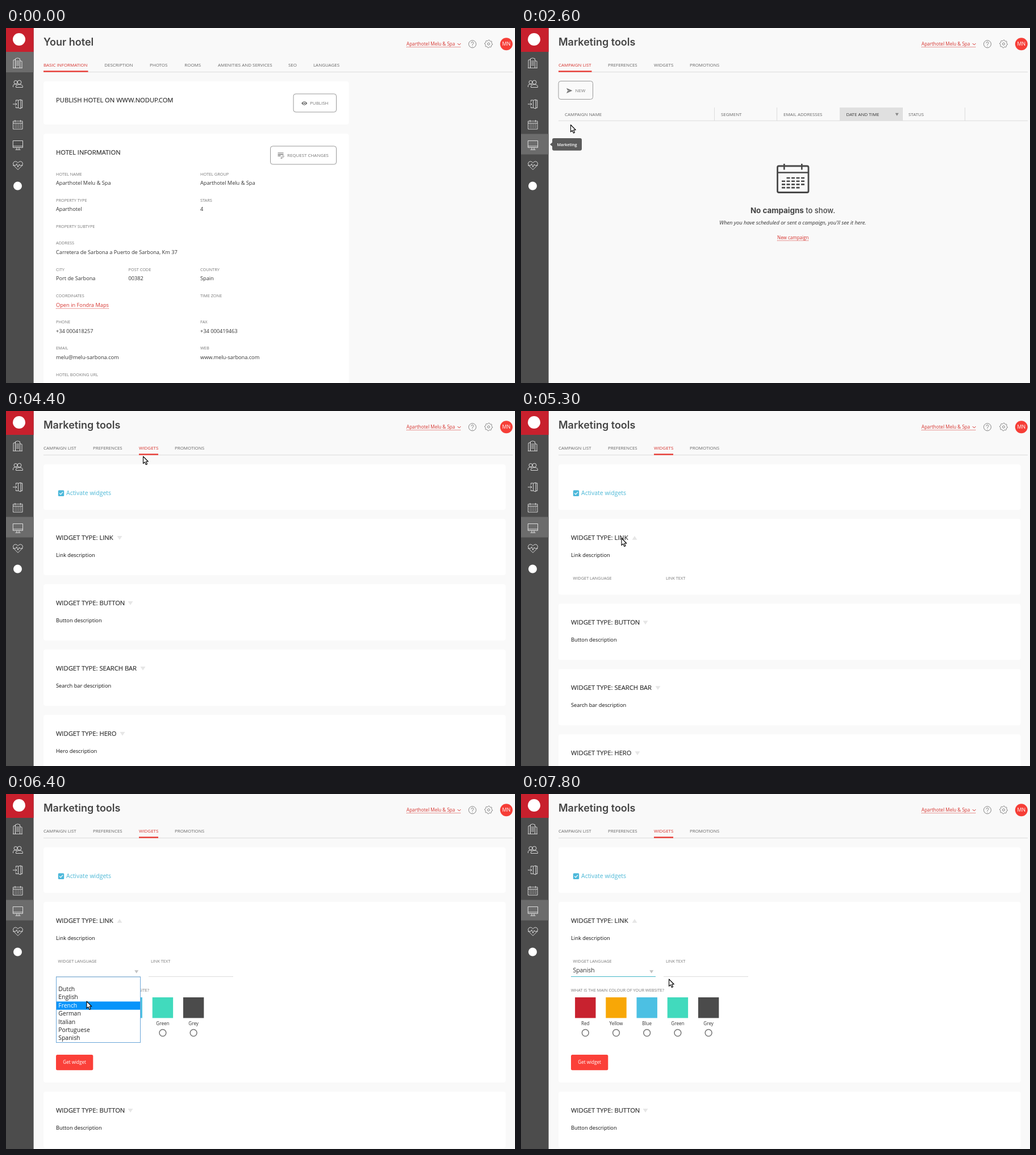
An HTML page that plays this animation: 896 by 625 pixels, repeating every 8 s.

```html
<!DOCTYPE html>
<html lang="en">
<head>
<meta charset="utf-8">
<title>Hotel dashboard</title>
<style>
html, body { margin: 0; width: 100%; height: 100%; overflow: hidden; background: #f9f9f9; }
svg { display: block; width: 896px; height: 625px; font-family: "Open Sans", sans-serif; }
.title { font: 600 18px Inter, sans-serif; fill: #444; }
.icon { fill: none; stroke: #f2f2f2; stroke-width: .85; stroke-linejoin: round; }
.grey { fill: none; stroke: #777; stroke-width: .9; }
</style>
</head>
<body>
<svg id="stage" viewBox="0 0 896 625"></svg>
<script>
const RED = '#d6312c', LINE = '#dcdcdc';

const text = (x, y, size, fill, s, extra = '') =>
  `<text x="${x}" y="${y}" font-size="${size}" fill="${fill}" ${extra}>${s}</text>`;
const rect = (x, y, w, h, fill, r = 0, extra = '') =>
  `<rect x="${x}" y="${y}" width="${w}" height="${h}" fill="${fill}" rx="${r}" ${extra}/>`;
const path = (d, extra = '') => `<path d="${d}" ${extra}/>`;
const circle = (x, y, r, extra = '') => `<circle cx="${x}" cy="${y}" r="${r}" ${extra}/>`;
const group = (id, body, extra = '') => `<g id="${id}" ${extra}>${body}</g>`;
const hline = (x1, x2, y, color = LINE, extra = '') =>
  path(`M${x1} ${y}H${x2}`, `stroke="${color}" fill="none" ${extra}`);
const dotted = (x1, x2, y) => hline(x1, x2, y, RED, 'stroke-dasharray="1 1"');
const card = (x, y, w, h, id = '') => rect(x, y, w, h, '#fff', 4, id && `id="${id}"`);
const heading = (x, y, s) => text(x, y, 11.2, '#2b2b2b', s, 'stroke="#2b2b2b" stroke-width=".15"');
const label = (x, y, s) => text(x, y, 7.35, '#777', s);
const value = (x, y, s) => text(x, y, 9.2, '#333', s);
const outline = (x, y, w, h) => rect(x, y, w, h, '#fff', 4, 'stroke="#999"');
const tri = (x, y, w, h, fill, id = '') =>
  path(`M${x - w / 2} ${y - h / 2}h${w}l${-w / 2} ${h}z`, `fill="${fill}" ${id && `id="${id}"`}`);

function tabs(list, active) {
  return list.map(([x, s], i) =>
    text(x, 68, 7.95, i === active ? RED : '#666', s, s === 'WIDGETS' ? 'class="wtab"' : '')).join('');
}
const marker = (x1, x2) => rect(x1, 75.2, x2 - x1, 2.4, '#ea3c36');

function sidebar() {
  const cells = [0, 1, 2, 3].flatMap(c => [0, 1, 2].map(r =>
    `M${15 + c * 3.3} ${169.5 + r * 2.7}h1.9`)).join('');
  const icons = [
    'M13 70V56.5L16.5 55.5V70M16.5 70V54L20.5 52.8L24.5 54V70M24.5 57.5L28 58.5V70M12 70.3H29M19.2 57V67M21.8 57V67',
    'M12.5 104V101.5Q13 98.8 16.5 98.8Q19 98.8 20 100.5M17 98.5A3 3 0 1 1 17.1 92.5A3 3 0 0 1 17 98.5' +
      'M17.5 104.5V102.5Q18 99.6 23.5 99.6Q29 99.6 29.3 102.5V104.5ZM23.5 99A3.4 3.4 0 1 1 23.6 92.2A3.4 3.4 0 0 1 23.5 99',
    'M12 134H19M16.3 131.3L19 134L16.3 136.7M17.5 130V127H21.5M17.5 138V140.5H21.5M21.5 127.5L26 126V142L21.5 140.5ZM26 127H28.7V140.5H26',
    'M12.5 164H29V178H12.5ZM12.5 167.5H29M16 162V165.5M25.5 162V165.5' + cells,
    'M12.3 198.5H29.5V210.5H12.3ZM12.3 208H29.5M19 210.5V214M23 210.5V214M16.5 214.3H25.5',
    'M21 249.5L14.5 243Q11 238.5 14 235.8Q17.6 233.3 21 237.5Q24.4 233.3 28 235.8Q31 238.5 27.5 243Z' +
      'M12 242H17L18.8 239L21 245L23.3 240L24.5 242H29.5'
  ];
  return rect(0, 0, 48.6, 625, '#4c4c4c') + rect(0, 0, 48.6, 42, '#c8202d') +
    circle(23, 20, 11, 'fill="#fff"') +
    rect(0, 42, 48.6, 36, '#6c6c6c', 0, 'id="active"') +
    icons.map(d => path(d, 'class="icon"')).join('') +
    circle(20.5, 278, 7.5, 'fill="#fff"');
}

function header() {
  let gear = '';
  for (let i = 0; i < 32; i++) {
    const r = i % 4 < 2 ? 6.9 : 5.6, a = i * Math.PI / 16;
    gear += `${i ? 'L' : 'M'}${849.5 + r * Math.cos(a)} ${28 + r * Math.sin(a)}`;
  }
  return hline(66, 892, 77.5) +
    text(705, 31, 8.13, RED, 'Aparthotel Melu &amp; Spa') + dotted(705, 801, 33.5) +
    path('M795 27L797.7 30L800.4 27', `fill="none" stroke="${RED}"`) +
    circle(821, 28.3, 6.5, 'class="grey"') +
    path('M818.8 26.8Q818.9 24.6 821 24.6Q823.2 24.7 823.2 26.5Q823 27.8 821 28.8V30M821 31.2V32.4', 'class="grey"') +
    path(gear + 'Z', 'class="grey"') + circle(849.5, 28, 2, 'class="grey"') +
    circle(880.8, 28.2, 11, 'fill="#f63e37"') +
    text(880.8, 31.4, 8.8, '#fff', 'MN', 'text-anchor="middle"');
}

function hotelPage() {
  const A = 88, B = 342;
  const rows = [
    [A, 257, 'HOTEL NAME', 'Aparthotel Melu &amp; Spa'], [B, 257, 'HOTEL GROUP', 'Aparthotel Melu &amp; Spa'],
    [A, 303, 'PROPERTY TYPE', 'Aparthotel'], [B, 303, 'STARS', '4'],
    [A, 349.5, 'PROPERTY SUBTYPE', ''],
    [A, 378.5, 'ADDRESS', 'Carretera de Sarbona a Puerto de Sarbona, Km 37'],
    [A, 425, 'CITY', 'Port de Sarbona'], [215.5, 425, 'POST CODE', '00382'], [B, 425, 'COUNTRY', 'Spain'],
    [A, 471, 'COORDINATES', ''], [B, 471, 'TIME ZONE', ''],
    [A, 517.5, 'PHONE', '+34 000418257'], [B, 517.5, 'FAX', '+34 000419463'],
    [A, 563.5, 'EMAIL', 'melu@melu-sarbona.com'], [B, 563.5, 'WEB', 'www.melu-sarbona.com'],
    [A, 610, 'HOTEL BOOKING URL', '']
  ];
  return text(66, 31, 18, '#444', 'Your hotel', 'class="title"') +
    tabs([[66, 'BASIC INFORMATION'], [173.3, 'DESCRIPTION'], [253, 'PHOTOS'], [314.3, 'ROOMS'],
      [373, 'AMENITIES AND SERVICES'], [497, 'SEO'], [541, 'LANGUAGES']], 0) + marker(66, 144.5) +
    card(66, 94, 537.5, 76) + heading(88, 131, 'PUBLISH HOTEL ON WWW.NODUP.COM') +
    outline(506, 116, 75.5, 32) +
    path('M520 132.5Q525.2 125.5 530.4 132.5Q525.2 139.5 520 132.5Z', 'fill="#666"') +
    circle(525.2, 132.5, 2.4, 'fill="#fff"') + circle(525.2, 132.5, 1.3, 'fill="#666"') +
    text(535, 135.4, 8, '#777', 'PUBLISH') +
    card(66, 186, 537.5, 450) + heading(88, 223, 'HOTEL INFORMATION') +
    outline(465.5, 208, 116, 32) +
    path('M478.5 220H488.5M478.5 222.6H488.5M478.5 225.2H483.5', 'stroke="#666" stroke-width="1.2"') +
    path('M484 229.6L484.4 227.8L488 224.5L489.5 226L485.8 229.3Z', 'class="grey"') +
    text(495, 227.2, 7.95, '#777', 'REQUEST CHANGES') +
    rows.map(([x, y, l, v]) => label(x, y + 2.6, l) + (v && value(x, y + 19.2, v))).join('') +
    text(88, 490.5, 9.25, RED, 'Open in Fondra Maps') + dotted(88, 181, 493.8);
}

const marketingTabs = [[66, 'CAMPAIGN LIST'], [153, 'PREFERENCES'], [234, 'WIDGETS'], [297, 'PROMOTIONS']];
const marketingTop = active =>
  text(66, 31, 18, '#444', 'Marketing tools', 'class="title"') + tabs(marketingTabs, active);

function campaignPage() {
  const cols = [[77, 'CAMPAIGN NAME'], [352, 'SEGMENT'], [462, 'EMAIL ADDRESSES'], [572.5, 'DATE AND TIME'], [682, 'STATUS']];
  let dashes = '';
  for (let r = 0; r < 4; r++)
    for (let c = r ? 0 : 1; c < (r === 3 ? 4 : 5); c++) dashes += `M${459 + c * 8.5} ${264 + r * 5.7}h6`;
  return marketingTop(0) + marker(66, 124.5) +
    rect(66, 93.5, 60.5, 32, '#fafafa', 4, 'stroke="#999"') +
    path('M80 105.7L90.5 110.3L80 115L82 110.8L86 110.3L82 109.8Z', 'fill="#777"') +
    text(95.5, 113.2, 7.95, '#777', 'NEW') +
    rect(561, 140, 110, 23, '#e0e0e0') + hline(66, 892, 163.3) +
    path('M340.5 140V163M450.5 140V163M781.5 140V163M671.5 140V163', `stroke="${LINE}"`) +
    cols.map(([x, s], i) => text(x, 155, 7.95, i === 3 ? '#333' : '#666', s)).join('') +
    tri(661.8, 152.2, 6, 5, '#888') +
    rect(451.5, 243, 54.5, 46.5, 'none', 2.5, 'stroke="#484848" stroke-width="2.8"') +
    path('M451 254.5H506M463.3 239V249.5M494.3 239V249.5', 'stroke="#484848" stroke-width="2.6"') +
    path(dashes, 'stroke="#484848" stroke-width="2.6"') +
    `<text x="478.5" y="325.5" text-anchor="middle" font-family="Inter, sans-serif" font-size="13" font-weight="500" fill="#444"><tspan font-weight="700" font-size="13.4">No campaigns</tspan> to show.</text>` +
    text(478.5, 346, 9.25, '#333', 'When you have scheduled or sent a campaign, you\'ll see it here.', 'text-anchor="middle" font-style="italic"') +
    text(478.8, 372, 8.05, RED, 'New campaign', 'text-anchor="middle"') + dotted(451, 507, 374.3);
}

const widgetText = (name, y) =>
  heading(88, y + 37, 'WIDGET TYPE: ' + name) +
  text(88, y + 67, 9.3, '#111', name[0] + name.slice(1).toLowerCase() + ' description');

function form() {
  const swatches = [['Red', '#c8222f'], ['Yellow', '#f8a706'], ['Blue', '#4cc0e3'], ['Green', '#41dabd'], ['Grey', '#4b4b4b']];
  return label(91.5, 297.4, 'WIDGET LANGUAGE') + label(255, 297.4, 'LINK TEXT') +
    hline(88, 237, 321.5, LINE, 'id="field"') + hline(251, 400, 321.5) + tri(229.7, 313, 7, 5.5, '#c4c4c4') +
    text(91.5, 314, 10.4, '#333', 'Spanish', 'id="choice"') +
    label(88, 347.8, 'WHAT IS THE MAIN COLOUR OF YOUR WEBSITE?') +
    swatches.map(([name, color], i) => {
      const x = 113.3 + i * 54.2;
      return rect(x - 18.2, 358, 36.4, 36.4, color) +
        text(x, 406.6, 8.1, '#333', name, 'text-anchor="middle"') +
        circle(x, 420.5, 5.9, 'fill="#fff" stroke="#777" stroke-width="1.5"');
    }).join('') +
    rect(88, 459, 65.3, 27.3, '#fb4039', 2.5) +
    text(120.6, 475.4, 8.15, '#fff', 'Get widget', 'text-anchor="middle"');
}

const ROW = 14.45, LIST_TOP = 321.5;
const languages = ['', 'Dutch', 'English', 'French', 'German', 'Italian', 'Portuguese', 'Spanish'];

function widgetPage() {
  const others = [['BUTTON', 305, 219], ['SEARCH BAR', 420, 241], ['HERO', 535, 205]];
  return marketingTop(2) + marker(234, 268) +
    card(66, 94, 813.5, 80) + rect(91.8, 139.5, 10.4, 10.4, '#4cb8da', 1.5) +
    path('M94.2 144.7L96.3 146.9L100 142.6', 'fill="none" stroke="#fff" stroke-width="1.3"') +
    text(106, 148.3, 10.5, '#4cb8d6', 'Activate widgets') +
    card(66, 190, 813.5, 99, 'linkCard') + widgetText('LINK', 190) +
    tri(200, 223.4, 9, 6.6, '#e6e6e6', 'arrow') +
    `<clipPath id="clip">${rect(66, 274, 814, 0, '#000', 0, 'id="clipBox"')}</clipPath>` +
    group('form', form(), 'clip-path="url(#clip)"') +
    group('others', others.map(([name, y, x]) =>
      card(66, y, 813.5, 99) + widgetText(name, y) + tri(x, y + 33.4, 9, 6.6, '#e6e6e6')).join('')) +
    group('list', rect(88.5, 322, 148, 115.5, '#fff', 0, 'stroke="#6aa6d8"') +
      rect(89, LIST_TOP + .5, 147, ROW, '#0894fa', 0, 'id="hover"') +
      languages.map((s, i) => text(92.3, LIST_TOP + 10.8 + i * ROW, 10.4, '#222', s, 'class="option"')).join(''));
}

const tooltip = rect(55, 194, 52, 21.7, '#424242', 3) + path('M55.5 201L51 204.9L55.5 208.8Z', 'fill="#424242"') +
  text(81, 207.6, 7.15, '#fff', 'Marketing', 'text-anchor="middle" font-weight="600"');

const stage = document.getElementById('stage');
stage.innerHTML = rect(0, 0, 896, 625, '#f9f9f9') + sidebar() + header() +
  group('hotel', hotelPage()) + group('campaigns', campaignPage()) + group('widgets', widgetPage()) +
  group('tip', tooltip) +
  group('cursor', path('M0 0V12.4L2.8 9.8L4.9 14.4L7 13.5L5 9H8.8Z', 'fill="#fff" stroke="#000" stroke-width="1.1" stroke-linejoin="round"'));

const $ = id => document.getElementById(id);
const options = [...document.querySelectorAll('.option')];
const widgetTab = $('campaigns').querySelector('.wtab');
const show = (id, on) => $(id).setAttribute('display', on ? 'inline' : 'none');
const clamp = v => Math.max(0, Math.min(1, v));
const ease = v => { v = clamp(v); return v * v * (3 - 2 * v); };

// Pointer stops: time, x, y
const stops = [
  [200, 300, 560], [300, 277, 523], [900, 14, 180], [1100, 25, 201], [1300, 25, 200], [2300, 25, 200],
  [2600, 87.5, 170.5], [2900, 181, 86], [3400, 249, 66], [4300, 249, 66], [4400, 241.5, 80],
  [4900, 177, 224], [5500, 177, 224], [5900, 141.5, 311], [6100, 141.5, 316], [6400, 142, 365],
  [6600, 142, 365], [7300, 142, 426], [7400, 142, 426], [7800, 260.5, 326], [8000, 260.5, 326]
];
function pointer(t) {
  const i = Math.max(1, stops.findIndex(s => s[0] >= t));
  const [t0, x0, y0] = stops[i - 1], [t1, x1, y1] = stops[i];
  const k = clamp((t - t0) / (t1 - t0));
  return [x0 + (x1 - x0) * k, y0 + (y1 - y0) * k];
}

function render(t) {
  const [x, y] = pointer(t);
  show('cursor', t >= 300);
  $('cursor').setAttribute('transform', `translate(${x} ${y})`);

  show('hotel', t < 2100);
  show('campaigns', t >= 2100 && t < 3900);
  show('widgets', t >= 3900);
  $('active').setAttribute('y', t < 2100 ? 42 : 186.5);
  widgetTab.setAttribute('fill', t >= 3300 ? RED : '#666');

  const tip = t < 1000 ? 0 : t < 2600 ? 1 : clamp((2900 - t) / 350);
  $('tip').setAttribute('opacity', tip);

  const grow = 219 * ease((t - 5200) / 400);
  $('linkCard').setAttribute('height', 99 + grow);
  $('clipBox').setAttribute('height', grow);
  $('others').setAttribute('transform', `translate(0 ${grow})`);
  $('arrow').setAttribute('transform', t >= 5300 ? 'rotate(180 200 223.4)' : '');

  const open = t >= 6000 && t < 7500;
  show('list', open);
  show('choice', t >= 7500);
  $('field').setAttribute('stroke', t >= 7500 ? '#45b8c8' : LINE);
  const row = Math.max(0, Math.min(7, Math.floor((y - LIST_TOP) / ROW)));
  $('hover').setAttribute('y', LIST_TOP + .5 + row * ROW);
  options.forEach((o, i) => o.setAttribute('fill', i === row ? '#fff' : '#222'));
}

// The screen advances in tenths of a second
function frame(now) {
  render(Math.floor(now % 8000 / 100) * 100);
  requestAnimationFrame(frame);
}
render(0);
requestAnimationFrame(frame);
</script>
</body>
</html>
```
